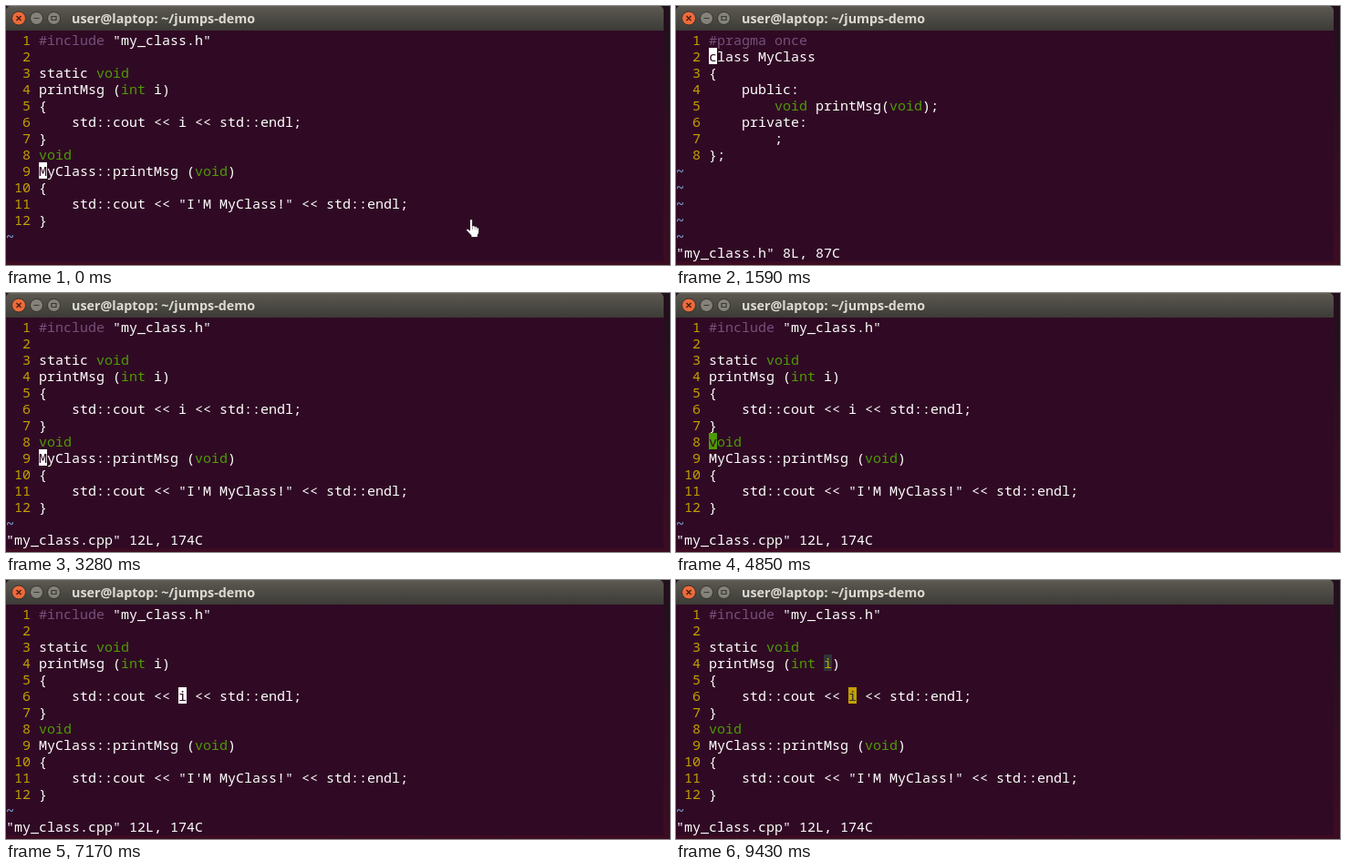
These frames come from a looping animation (728 px wide and 285 px high, 9940 ms). An HTML page:

```html
<!DOCTYPE html>
<html lang="en">
<head>
<meta charset="utf-8">
<title>Terminal</title>
<style>
  html, body { margin: 0; width: 100%; height: 100%; overflow: hidden; }
  body { background: linear-gradient(#21101c, #3d0c22); }
  #stage { position: relative; width: 728px; height: 285px; overflow: hidden; }
  #bar {
    position: absolute; left: 0; top: 0; width: 721px; height: 27px;
    border-radius: 5px 5px 0 0;
    background: linear-gradient(#66645b, #59574f 2px, #3c3b37);
  }
  #bar svg { position: absolute; left: 0; top: 0; }
  #title {
    position: absolute; left: 72px; top: 0; white-space: pre;
    font: bold 14.3px/27px "Open Sans", sans-serif; color: #dfdbd2;
  }
  #term {
    position: absolute; left: 0; top: 27px; width: 721px; height: 254px;
    background: #300a24; color: #fff;
  }
  #term pre, #term span.cell {
    position: absolute; margin: 0; white-space: pre;
    font: 15px/18px "Noto Sans Mono", monospace; font-variant-ligatures: none;
  }
  #term pre { left: 0; top: 1px; }
  #term pre#status { top: 235px; }
  #term span.cell { width: 9px; height: 18px; overflow: hidden; }
  .num { color: #c4a000; }
  .pre { color: #75507b; }
  .type { color: #4e9a06; }
  .tilde { color: #729fcf; font-weight: bold; }
  .pointer { position: absolute; left: 0; top: 0; overflow: visible; }
</style>
</head>
<body>
<div id="stage">
  <div id="bar">
    <svg width="70" height="27" fill="none">
      <circle cx="14" cy="13.5" r="7.5" fill="#ee6a3a" stroke="#33312c"/>
      <path d="M11.5 11l5 5m0-5l-5 5" stroke="#4a2114" stroke-width="1.5"/>
      <g fill="#85827a" stroke="#33312c">
        <circle cx="33.5" cy="13.5" r="7"/>
        <circle cx="52.5" cy="13.5" r="7"/>
      </g>
      <path d="M30.5 13.5h6M50 11.5h5v4h-5z" stroke="#3a3833" stroke-width="1.2"/>
    </svg>
    <div id="title">user@laptop: ~/jumps-demo</div>
  </div>
  <div id="term">
    <pre id="code"></pre>
    <pre id="status"></pre>
    <div id="cells"></div>
  </div>
  <svg class="pointer" id="hand" width="1" height="1">
    <path transform="translate(504 234)" fill="#fff" stroke="#1b0a16" stroke-width=".8" stroke-linejoin="round"
      d="M4.5 12V2.2Q4.5.5 6 .5T7.5 2.2V8Q9.5 7 10.2 8.8 12 8 12.6 9.8 14.6 9.4 14.6 11.5V14.5Q14.4 16.5 13.2 18V20.5H6V18.5L1 13.2Q.2 11.8 1.4 11.3 2.6 10.8 4.5 13Z"/>
    <path transform="translate(504 234)" d="M7.5 8v4M10.2 9v3M12.6 10v2.5" stroke="#77656f" stroke-width=".6"/>
  </svg>
  <svg class="pointer" id="beam" width="1" height="1" fill="none">
    <path d="M-3 -8.5h2l1 1 1-1h2M0 -8V8M-3 8.5h2l1-1 1 1h2" stroke="#fff" stroke-width="1.3"/>
  </svg>
</div>
<script>
const LOOP = 9940;
const PURPLE = '#300a24', WHITE = '#fff', GREEN = '#4e9a06';
const YELLOW = '#c4a000', BLACK = '#2e3436', CYAN = '#06989a';
const $ = id => document.getElementById(id);

// Markup: {p ...} is a directive, {t ...} a type keyword.
const source = [
  '{p #include} "my_class.h"', '', 'static {t void}', 'printMsg ({t int} i)',
  '{', '    std::cout << i << std::endl;', '}', '{t void}',
  'MyClass::printMsg ({t void})', '{',
  '    std::cout << "I\'M MyClass!" << std::endl;', '}'
];
const header = [
  '{p #pragma once}', 'class MyClass', '{', '    public:',
  '        {t void} printMsg({t void});', '    private:', '        ;', '};'
];

const tag = (name, text) => `<span class="${name}">${text}</span>`;

function screenHtml(lines) {
  const rows = lines.map((line, i) =>
    tag('num', String(i + 1).padStart(3)) + ' ' +
    line.replace(/</g, '&lt;')
      .replace(/\{([pt]) ([^}]+)\}/g, (_, kind, text) => tag(kind === 'p' ? 'pre' : 'type', text)));
  while (rows.length < 13) rows.push(tag('tilde', '~'));
  return rows.join('\n');
}

const cell = (row, col, bg = WHITE, fg = PURPLE) => ({ row, col, bg, fg });
const onLine6 = col => [cell(6, col)];
const match = cell(6, 21, YELLOW, BLACK);
const found = [match, cell(4, 18, BLACK, YELLOW)];
const foundBlink = [match, cell(4, 18, YELLOW, BLACK)];

const screens = {
  start: { html: screenHtml(source), status: '' },
  header: { html: screenHtml(header), status: '"my_class.h" 8L, 87C' },
  source: { html: screenHtml(source), status: '"my_class.cpp" 12L, 174C' }
};

const steps = [
  [0, 'start', [cell(9, 4)]],
  [1590, 'header', [cell(2, 4)]],
  [2220, 'header', []],
  [3280, 'source', [cell(9, 4)]],
  [3830, 'source', []],
  [4390, 'source', [cell(9, 4)]],
  [4850, 'source', [cell(8, 4, GREEN)]],
  [5000, 'source', [cell(7, 4), cell(5, 4, CYAN, WHITE)]],
  [5140, 'source', onLine6(7)],
  [5690, 'source', onLine6(8)],
  [6240, 'source', onLine6(10)],
  [6320, 'source', onLine6(12)],
  [6390, 'source', onLine6(15)],
  [6470, 'source', onLine6(17)],
  [6630, 'source', onLine6(18)],
  [6780, 'source', onLine6(19)],
  [7010, 'source', onLine6(20)],
  [7170, 'source', onLine6(21)],
  [7720, 'source', []],
  [8250, 'source', found],
  [8800, 'source', foundBlink],
  [9430, 'source', found]
];

// Text pointer positions; null hides it.
const beamSteps = [
  [0, null], [70, [507.5, 235]], [1590, null],
  [8880, [525, 202]], [8960, [560, 178]], [9030, [585, 150]], [9110, null]
];

const current = (list, t) => list.findLast(step => step[0] <= t);
let shownScreen, shownStep;

function showScreen(name) {
  if (name === shownScreen) return;
  shownScreen = name;
  $('code').innerHTML = screens[name].html;
  $('status').textContent = screens[name].status;
}

function showCells(cells) {
  const rows = $('code').textContent.split('\n');
  $('cells').replaceChildren(...cells.map(({ row, col, bg, fg }) => {
    const el = document.createElement('span');
    el.className = 'cell';
    el.textContent = rows[row - 1][col] || ' ';
    el.style.cssText = `left:${col * 9}px;top:${row * 18 - 17}px;background:${bg};color:${fg}`;
    return el;
  }));
}

function render(t) {
  const step = current(steps, t);
  if (step !== shownStep) {
    shownStep = step;
    showScreen(step[1]);
    showCells(step[2]);
  }
  const spot = current(beamSteps, t)[1];
  $('hand').style.display = t < 70 ? '' : 'none';
  $('beam').style.display = spot ? '' : 'none';
  if (spot) $('beam').style.transform = `translate(${spot[0]}px, ${spot[1]}px)`;
}

const begin = performance.now();
function tick() {
  render((performance.now() - begin) % LOOP);
  requestAnimationFrame(tick);
}
tick();
</script>
</body>
</html>
```
